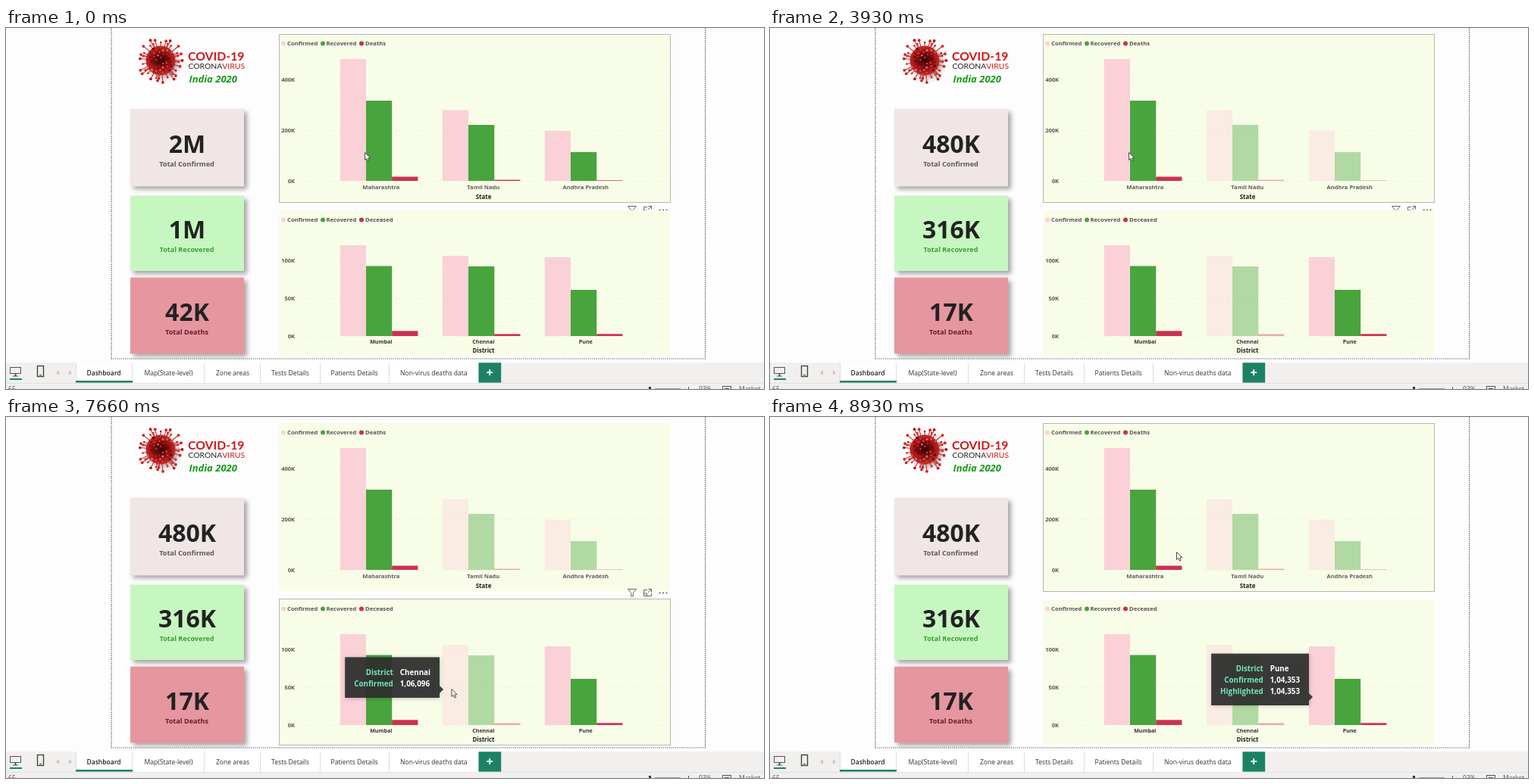
Recreate the animation shown at these times as an HTML page with a canvas. Size 1000 by 477 pixels, loop 9000 ms.

```html
<!DOCTYPE html>
<html lang="en">
<head>
<meta charset="utf-8">
<title>Case dashboard</title>
<style>
html, body { margin: 0; width: 100%; height: 100%; overflow: hidden; background: #fefdfe; }
canvas { display: block; width: 1000px; height: 477px; }
</style>
</head>
<body>
<canvas id="stage"></canvas>
<script>
const LOOP = 9000, W = 1000, H = 477;
const FONT = '"Open Sans", "Noto Sans", sans-serif';
const TITLE_FONT = 'Lato, "Open Sans", sans-serif';
const SERIES = ['#fbd1d8', '#48a43c', '#cd3150'];
const BAR = 34.2;

const stateChart = {
  top: 8, bottom: 230, base: 202, axis: 'State', labelSize: 7.6,
  legend: ['Confirmed', 'Recovered', 'Deaths'],
  ticks: [['400K', 68], ['200K', 135], ['0K', 202]],
  groups: [
    { name: 'Maharashtra', x: 440.8, tops: [41, 96, 196.5], selected: true },
    { name: 'Tamil Nadu', x: 575.8, tops: [108.5, 128, 200.6] },
    { name: 'Andhra Pradesh', x: 710.8, tops: [136, 164, 201.3] }
  ]
};
const districtChart = {
  top: 241, bottom: 433, base: 407, axis: 'District', labelSize: 7.1,
  legend: ['Confirmed', 'Recovered', 'Deceased'],
  ticks: [['100K', 307], ['50K', 357], ['0K', 407]],
  groups: [
    { name: 'Mumbai', x: 440.8, tops: [287, 314.5, 400.3], selected: true, values: ['1,20,150', '92661'] },
    { name: 'Chennai', x: 575.8, tops: [301, 315, 404.5], values: ['1,06,096', '92044'] },
    { name: 'Pune', x: 710.8, tops: [303, 346, 404.3], selected: true, values: ['1,04,353', '60857'] }
  ]
};
const cards = [
  { y: 106.7, h: 102.6, fill: '#f0e6e6', ink: '#5f5959', label: 'Total Confirmed', values: ['2M', '480K'] },
  { y: 221.6, h: 99.4, fill: '#c6f7c0', ink: '#3f9c38', label: 'Total Recovered', values: ['1M', '316K'] },
  { y: 329.7, h: 100.6, fill: '#e6969f', ink: '#6a1c28', label: 'Total Deaths', values: ['42K', '17K'] }
];
// Pointer path: time, x, y
const path = [
  [0, 473, 164], [6060, 473, 164], [6800, 456.5, 340], [7400, 456.5, 340],
  [7640, 582, 360], [7660, 587, 359], [8120, 779, 363], [8130, 785, 364],
  [8260, 796, 366], [8330, 796, 366], [8560, 721, 370], [8580, 704, 352], [8930, 536, 178]
];

const canvas = document.getElementById('stage');
const c = canvas.getContext('2d');
const ratio = window.devicePixelRatio || 1;
canvas.width = W * ratio;
canvas.height = H * ratio;

const progress = (t, from, to) => Math.min(1, Math.max(0, (t - from) / (to - from)));
const smooth = p => p * p * (3 - 2 * p);

function rect(x, y, w, h, fill) {
  c.fillStyle = fill;
  c.fillRect(x, y, w, h);
}
function text(value, x, y, size, color, align = 'left', style = 'bold', family = FONT) {
  c.font = `${style} ${size}px ${family}`;
  c.fillStyle = color;
  c.textAlign = align;
  c.fillText(value, x, y);
}
function line(points, color, width = 1, dash = []) {
  c.beginPath();
  points.forEach(([x, y]) => c.lineTo(x, y));
  c.strokeStyle = color;
  c.lineWidth = width;
  c.setLineDash(dash);
  c.stroke();
  c.setLineDash([]);
}
function polygon(points, fill, stroke) {
  c.beginPath();
  points.forEach(([x, y]) => c.lineTo(x, y));
  c.closePath();
  if (fill) { c.fillStyle = fill; c.fill(); }
  if (stroke) { c.strokeStyle = stroke; c.lineWidth = 1; c.stroke(); }
}
function dot(x, y, r, fill) {
  c.beginPath();
  c.arc(x, y, r, 0, 2 * Math.PI);
  c.fillStyle = fill;
  c.fill();
}
function outline(x, y, w, h, color, width = 1) {
  c.strokeStyle = color;
  c.lineWidth = width;
  c.strokeRect(x, y, w, h);
}
function withShadow(color, blur, offset, draw) {
  c.save();
  c.shadowColor = color;
  c.shadowBlur = blur * ratio;
  c.shadowOffsetX = c.shadowOffsetY = offset * ratio;
  draw();
  c.restore();
}

function cursorAt(t) {
  const next = path.findIndex(p => p[0] > t);
  if (next < 0) return path[path.length - 1].slice(1);
  const [t0, x0, y0] = path[next - 1], [t1, x1, y1] = path[next];
  let p = progress(t, t0, t1);
  if (t1 === 6800) p = smooth(p);
  return [x0 + (x1 - x0) * p, y0 + (y1 - y0) * p];
}

// The tooltip keeps the last district bar the pointer touched.
function lastHover(t) {
  for (let s = Math.floor((t - 10) / 20) * 20; s > 6200; s -= 20) {
    const [x, y] = cursorAt(s);
    for (const group of districtChart.groups)
      for (const i of [0, 1]) {
        const left = group.x + i * BAR;
        if (x >= left && x <= left + BAR && y >= group.tops[i] && y <= districtChart.base)
          return { group, i, x, y };
      }
  }
}

function drawVirus(x, y) {
  withShadow('rgba(90,80,80,.65)', 8, 4, () => dot(x, y, 18, '#8a1414'));
  for (let i = 0; i < 36; i++) {
    const a = i * Math.PI / 18 + .1 * Math.sin(i * 5);
    const r = i % 2 ? 24 : 28.5 + 1.8 * Math.sin(i * 2.4);
    const ex = x + r * Math.cos(a), ey = y + r * Math.sin(a);
    line([[x, y], [ex, ey]], '#c4302c', 1.1);
    dot(ex, ey, i % 2 ? 1.3 : 1.9, i % 3 ? '#d9211f' : '#b01a1a');
  }
  const shade = c.createRadialGradient(x, y - 1, 3, x, y, 20);
  shade.addColorStop(0, '#3d0506');
  shade.addColorStop(.5, '#8c1114');
  shade.addColorStop(1, '#cf2a28');
  dot(x, y, 19.5, shade);
  for (let i = 1; i < 44; i++) {
    const r = 19 * Math.sqrt(i / 44), a = i * 2.4;
    dot(x + r * Math.cos(a), y + r * Math.sin(a), 1 + (i % 3) * .3,
      ['#d8302b', '#5f080a', '#b91b1d', '#e26a60'][i % 4]);
  }
}

function drawHeading() {
  drawVirus(204, 43);
  text('COVID-19', 240, 43.2, 15.8, '#cf1717', 'left', 'bold', TITLE_FONT);
  text('CORONA', 240.5, 54, 10.4, '#222', 'left', 'normal', TITLE_FONT);
  const offset = c.measureText('CORONA').width;
  text('VIRUS', 240.5 + offset, 54, 10.4, '#cf1717', 'left', 'normal', TITLE_FONT);
  text('India 2020', 241.5, 71.5, 13, '#159b18', 'left', 'italic bold');
}

function drawCards(t) {
  for (const card of cards) {
    withShadow('rgba(80,70,75,.5)', 6, 4, () => rect(164, card.y, 150, card.h, card.fill));
    const middle = card.y + card.h / 2;
    text(card.values[t < 600 ? 0 : 1], 239, middle + 7, 32, '#222', 'center');
    text(card.label, 238.5, middle + 25, 9.1, card.ink, 'center');
  }
}

function drawChart(chart, drawBar) {
  rect(360, chart.top, 516.5, chart.bottom - chart.top, '#f8fde8');
  [[366, 371], [418, 422.5], [469, 474]].forEach(([x, tx], i) => {
    dot(x, chart.top + 12.5, 3, SERIES[i]);
    text(chart.legend[i], tx, chart.top + 15.3, 7.7, '#555');
  });
  for (const [label, y] of chart.ticks) {
    line([[386, y + .5], [872, y + .5]], '#e5e9d8', 1, [1, 3]);
    text(label, 381, y + 2.8, 7.5, '#555', 'right');
  }
  for (const group of chart.groups) {
    group.tops.forEach((top, i) => drawBar(group, group.x + i * BAR, top, chart.base - top, SERIES[i]));
    const ink = chart === stateChart ? '#605e5c' : '#333';
    text(group.name, group.x + 54, chart.base + (chart === stateChart ? 11 : 9.5), chart.labelSize, ink, 'center');
  }
  text(chart.axis, 630, chart.base + (chart === stateChart ? 23.5 : 21.5), 7.9, '#222', 'center');
}

function faded(alpha, draw) {
  c.globalAlpha = alpha;
  draw();
  c.globalAlpha = 1;
}

function drawCharts(t, hover) {
  const fade = 1 - .6 * progress(t, 100, 260);
  const shrink = 1 - smooth(progress(t, 1030, 1330));
  drawChart(stateChart, (group, x, y, h, fill) =>
    faded(group.selected ? 1 : fade, () => rect(x, y, BAR, h, fill)));
  if (hover === stateChart && t < 8400) drawHeaderIcons(240);
  drawChart(districtChart, (group, x, y, h, fill) => {
    if (group.selected) return rect(x, y, BAR, h, fill);
    faded(.4, () => rect(x, y, BAR, h, fill));
    rect(x, y + h * (1 - shrink), BAR, h * shrink, fill);
  });
  if (hover === districtChart) drawHeaderIcons(232);
  const top = hover === stateChart ? 8.5 : 240.5;
  outline(360.5, top, 516, hover.bottom + .5 - top, '#b5b8ae');
}

function drawHeaderIcons(y) {
  const ink = '#666';
  polygon([[820.5, y - 4.5], [831.5, y - 4.5], [827.3, y + .5], [827.3, y + 5], [824.7, y + 5], [824.7, y + .5]], null, ink);
  line([[846, y - 3.5], [841.5, y - 3.5], [841.5, y + 4.5], [851.5, y + 4.5], [851.5, y + 1]], ink);
  line([[847.5, y - 4.5], [851.5, y - 4.5], [851.5, y - .5]], ink);
  line([[847, y], [851.5, y - 4.5]], ink);
  line([[841.5, y + 1], [845.5, y + 1], [845.5, y + 4.5]], ink);
  for (let i = 0; i < 3; i++) dot(862.5 + i * 4.5, y + .5, 1.1, ink);
}

function drawPage() {
  rect(0, 0, W, H, '#fefdfe');
  line([[139, 0], [139, 437], [922.5, 437], [922.5, 0]], '#4a4a4a', 1.2, [1.2, 1.4]);
}

function drawFooter() {
  rect(0, 442, W, 35, '#f1f0ef');
  rect(92, 442, 531, 27, '#fff');
  line([[0, 469.5], [W, 469.5]], '#e4e2e1');
  outline(5.5, 448.5, 14, 8, '#555');
  line([[12.5, 457], [12.5, 460]], '#555', 2);
  line([[9, 460], [16, 460]], '#555');
  rect(5, 463, 16, 2, '#1b8263');
  outline(41.5, 446.5, 8, 14, '#444', 1.4);
  rect(44, 458, 3, 1, '#444');
  polygon([[70, 452], [70, 459], [66, 455.5]], '#c9c7c5');
  polygon([[83, 452], [83, 459], [87, 455.5]], '#c9c7c5');

  const tabs = [[129, 'Dashboard'], [214.5, 'Map(State-level)'], [299, 'Zone areas'],
    [375, 'Tests Details'], [459.5, 'Patients Details'], [564.3, 'Non-virus deaths data']];
  tabs.forEach(([x, label], i) =>
    text(label, x, 459, i ? 8.6 : 8.5, i ? '#333' : '#222', 'center', i ? 'normal' : '600'));
  for (const x of [92, 166, 261, 335, 414, 505]) rect(x, 443, 1, 26, '#dedcdb');
  rect(92, 466, 75, 2.6, '#1b8263');
  rect(623.5, 442.3, 29.7, 26.3, '#1b8263');
  rect(634.2, 454.2, 8, 1.8, '#fff');
  rect(637.3, 451.1, 1.8, 8, '#fff');

  const ink = '#555';
  text('65', 3, 480, 8.6, ink, 'left', 'normal');
  rect(848, 474, 3, 3, '#333');
  rect(856, 476, 34, 1, '#999');
  rect(900, 474, 1, 3, ink);
  text('93%', 914, 480, 8.6, ink, 'left', 'normal');
  outline(945.5, 473.5, 11, 8, ink);
  rect(948, 476, 6, 1, ink);
  text('Market', 967, 480, 8.6, ink, 'left', 'normal');
}

function drawTooltip({ group, i, x, y }) {
  const rows = [['District', group.name], [districtChart.legend[i], group.values[i]]];
  if (group.selected) rows.push(['Highlighted', group.values[i]]);
  c.font = `bold 9.8px ${FONT}`;
  const widest = k => Math.max(...rows.map(row => c.measureText(row[k]).width));
  const labelWidth = widest(0), w = labelWidth + widest(1) + 33;
  const h = rows.length * 14.8 + 24;
  const toRight = x < 540, side = toRight ? 1 : -1;
  const left = toRight ? x + 10.5 : x - 10 - w, top = y + 11 - h;
  const fill = 'rgba(48,48,47,.93)';
  withShadow('rgba(0,0,0,.25)', 5, 1, () => rect(left, top, w, h, fill));
  polygon([[x + side * 10, y - 5], [x + side * 5, y], [x + side * 10, y + 5]], fill);
  rows.forEach(([label, value], n) => {
    const baseline = top + 23.5 + n * 14.8;
    text(label, left + 12 + labelWidth, baseline, 9.8, '#72e5bf', 'right');
    text(value, left + 21 + labelWidth, baseline, 9.8, '#fff');
  });
}

function drawCursor(x, y) {
  const shape = [[0, 0], [0, 10], [2.3, 8], [4, 11.6], [5.6, 10.9], [4.1, 7.4], [7.2, 7.2]];
  polygon(shape.map(([dx, dy]) => [x + .5 + dx, y + .5 + dy]), '#fff', '#4a4a4a');
}

function frame(now) {
  const t = now % LOOP;
  const [x, y] = cursorAt(t);
  c.setTransform(ratio, 0, 0, ratio, 0, 0);
  drawPage();
  drawHeading();
  drawCards(t);
  drawCharts(t, y < 236 ? stateChart : districtChart);
  drawFooter();
  const hovered = lastHover(t);
  if (hovered) drawTooltip(hovered);
  drawCursor(x, y);
}

const start = performance.now();
function tick() {
  frame(performance.now() - start);
  requestAnimationFrame(tick);
}
tick();
</script>
</body>
</html>
```
